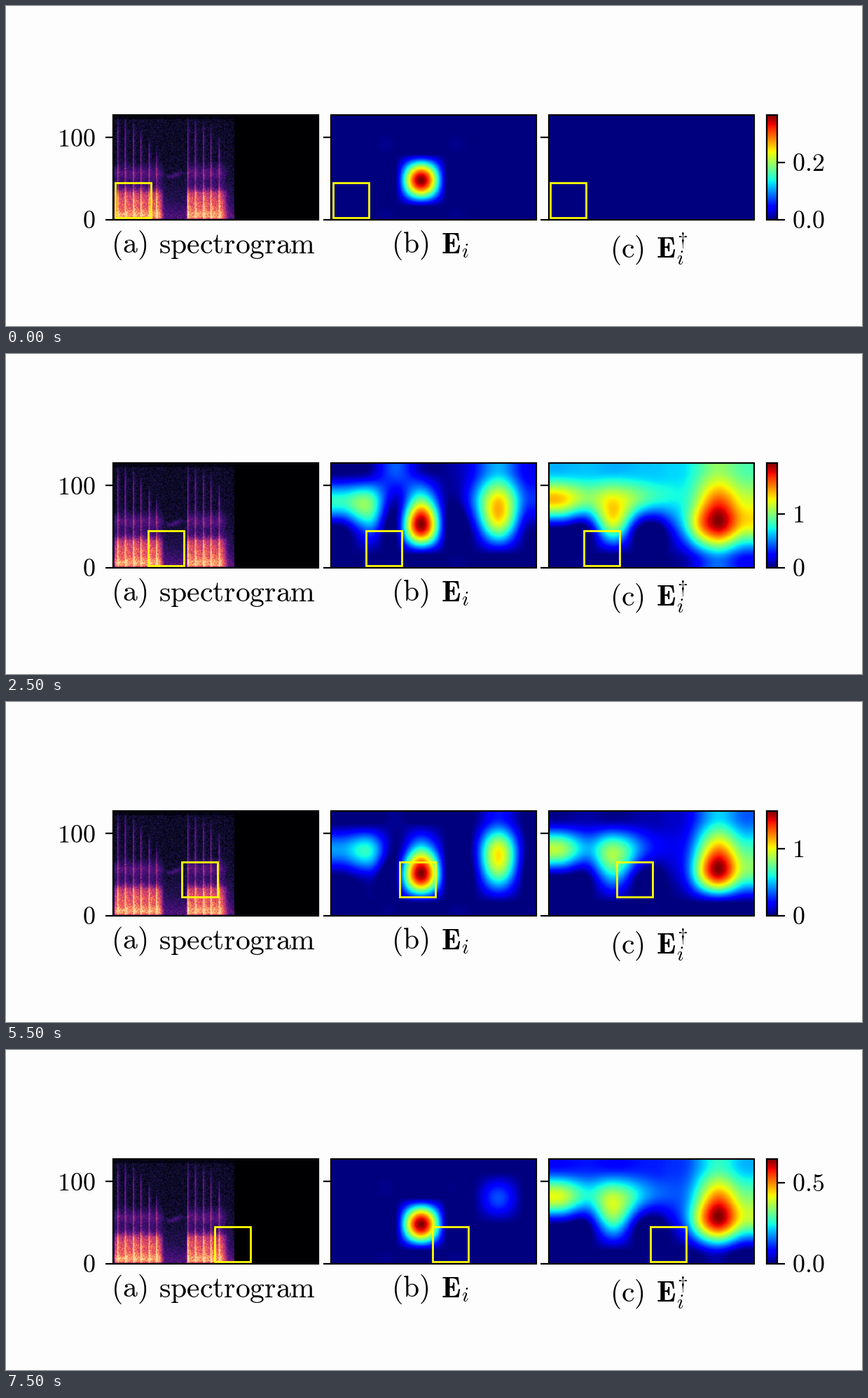
A matplotlib script for the animation above (8 s loop, 1222x458 px).

```python
import numpy as np
import matplotlib.pyplot as plt
from matplotlib.animation import FuncAnimation
from matplotlib.patches import Rectangle

W, H, DPI = 1222, 458, 128
PX = 72 / DPI  # points per pixel
FRAMES, INTERVAL = 16, 500
TOP, BOTTOM = 156, 306.2
LEFTS, PANEL_W = (153, 464, 774.5), 293.3
BAR_L, BAR_R = 1086, 1100.5
LINE = 2.22
BIG, MID, SMALL = 41.7, 36.1, 29.2

# Key points: step, peak of the middle map, threshold of the right map
KEYS = np.array([
    (0, 0.364, 1.2), (1, 0.85, 0.5), (2, 1.97, 0.22), (4, 2.49, 0), (7, 0.852, 0.5),
    (8, 1.1, 0.5), (9, 1.145, 0.5), (12, 1.76, 0.4), (15, 0.647, 0.35),
])

plt.rcParams["mathtext.fontset"] = "cm"


def bell(x, centre, width):
    return np.exp(-((x - centre) / width) ** 2 / 2)


def falling(x, middle, width):
    return 1 / (1 + np.exp((x - middle) / width))


def bumps(base, *items):
    """Coarse 4 x 8 map: a base per row plus (x, y, height, sx, sy) bells."""
    y, x = np.mgrid[:4, :8]
    return base(y) + sum(h * bell(x, cx, sx) * bell(y, cy, sy)
                         for cx, cy, h, sx, sy in items)


MAP_B = bumps(lambda y: -1.85 - 0.1 * y**2,
              (3, 1.9, 2.28, 0.45, 0.75), (6, 1.5, 1.6, 0.69, 1.1),
              (0, 0.95, 0.85, 0.4, 0.35), (1, 1.45, 1.4, 0.4, 0.55),
              (2, 0, 0.35, 0.5, 0.4))
MAP_C = bumps(lambda y: 0.17 - 0.3 * np.tanh(2 * y - 3),
              (6.1, 2.3, 0.95, 1.35, 0.65), (6.25, 1.05, 0.43, 0.7, 0.9),
              (0, 1, 0.38, 0.7, 0.35), (2, 2, 0.7, 0.42, 0.6),
              (2.4, 1, 0.22, 1, 0.3))


def cubic(x, a=-0.75):
    x = np.abs(x)
    near = (a + 2) * x**3 - (a + 3) * x**2 + 1
    far = a * (x**3 - 5 * x**2 + 8 * x - 4)
    return np.where(x <= 1, near, np.where(x < 2, far, 0))


def resampler(n, m):
    """Matrix that enlarges m cells to n samples with cubic weights."""
    pos = (np.arange(n) + 0.5) * m / n - 0.5
    mat = np.zeros((n, m))
    for j in range(-2, m + 2):
        mat[:, min(max(j, 0), m - 1)] += cubic(pos - j)
    return mat


ROWS, COLS = resampler(128, 4), resampler(250, 8)


def rectified(cells, lift):
    return np.maximum(ROWS @ np.maximum(cells + lift, 0) @ COLS.T, 0)


def with_peak(cells, peak):
    lift = peak
    for _ in range(6):
        lift += peak - rectified(cells, lift).max()
    return rectified(cells, lift)


def unit(field):
    return field / max(field.max(), 1e-9)


def spectrogram():
    rng = np.random.default_rng(7)
    t, f = np.arange(250), np.arange(128)[:, None]
    body = (0.08 + 0.1 * falling(f, 66, 3) + 0.07 * bell(f, 56, 4) + 0.1 * bell(f, 6, 3)
            + (0.52 - 0.006 * f) * falling(f, 35, 2))
    rest = 0.07 + 0.2 * np.exp(-f / 25)
    active = falling(t, 59, 1) + falling(-t, -89, 0.3) * falling(t, 136, 2)
    img = rest + (body - rest) * active
    img = img + 0.15 * bell(f, 54 + 2 * np.sin(t / 4), 2) * bell(t, 74, 7)

    for start, count in ((5, 6), (90, 5)):
        for k in range(count):
            age = t - round(start + 9.4 * k)
            reach = np.clip((130 - 1.6 * k**2 - f) / 25, 0, 1)
            hit = 0.27 * reach * np.exp(-age / 1.1) + 0.1 * falling(f, 38, 2) * np.exp(-age / 4)
            img = img + np.where(age >= 0, hit, 0)

    img = img + rng.normal(0, 0.06, img.shape) * (0.5 + img)
    img[:2] *= 0.7
    img[122:] *= 0.5
    img[:, 147:] = 0
    img[:, :2] *= 0.4
    return np.clip(img, 0, 0.93)


fig = plt.figure(figsize=(W / DPI, H / DPI), dpi=DPI, facecolor="#fdfdfd")
ax = fig.add_axes([0, 0, 1, 1])


def picture(data, left, right, cmap, origin="upper"):
    return ax.imshow(data, cmap=cmap, vmin=0, vmax=1, origin=origin, aspect="auto",
                     extent=(left, right, BOTTOM, TOP), zorder=1)


def frame(x, y, w, h, color="black", lw=LINE, zorder=4):
    return ax.add_patch(Rectangle((x, y), w, h, fill=False, ec=color, lw=lw * PX,
                                  joinstyle="miter", zorder=zorder))


def tick(x, length, y):
    return ax.plot([x, x + length], [y, y], color="black", lw=LINE * PX,
                   solid_capstyle="butt", zorder=4)[0]


def label(x, y, tex, size=BIG, ha="left"):
    return ax.text(x, y, f"${tex}$", fontsize=size * PX, ha=ha, va="baseline")


def level_y(value, peak):
    return BOTTOM - (BOTTOM - TOP) * value / peak


blank = np.zeros((128, 250))
picture(spectrogram(), LEFTS[0], LEFTS[0] + PANEL_W, "magma", "lower")
image_b = picture(blank, LEFTS[1], LEFTS[1] + PANEL_W, "jet")
image_c = picture(blank, LEFTS[2], LEFTS[2] + PANEL_W, "jet")
picture(np.linspace(1, 0, 256)[:, None], BAR_L, BAR_R, "jet")
ax.set(xlim=(0, W), ylim=(H, 0))
ax.axis("off")

boxes = []
for left in LEFTS:
    frame(left, TOP, PANEL_W, BOTTOM - TOP)
    for value in (0.5, 100.5):
        tick(left, -11.5, level_y(value, 128))
    box = frame(0, 0, 51, 50, "#ffff00", 2.8, 3)
    box.set_clip_path(Rectangle((left, TOP), PANEL_W, BOTTOM - TOP,
                                transform=ax.transData))
    boxes.append(box)
frame(BAR_L, TOP, BAR_R - BAR_L, BOTTOM - TOP)

label(127.5, 201, "100", MID, "right")
label(127.5, 318.5, "0", MID, "right")
tick(BAR_R, 11.5, BOTTOM)
bar_zero = label(1122.5, 318.5, "0", MID)
bar_tick = tick(BAR_R, 11.5, BOTTOM)
bar_label = label(1122.5, 318.5, "1", MID)

label(150, 353.5, r"\mathrm{(a)}")
label(217.5, 353.5, r"\mathrm{spectrogram}")
label(550, 353.5, r"\mathrm{(b)}")
label(621, 353.5, r"\mathbf{E}")
label(649.5, 360, "i", SMALL)
label(862, 360, r"\mathrm{(c)}")
label(927.5, 360, r"\mathbf{E}")
label(957, 370.5, "i", SMALL)
label(958, 343, r"\dagger", SMALL)


def update(n):
    col, row = divmod(n, 5)
    for box, left in zip(boxes, LEFTS):
        box.set_xy((left + 2.8 + 47.5 * col, 252.7 - 23.9 * row))

    peak, cut = (np.interp(n, KEYS[:, 0], KEYS[:, i]) for i in (1, 2))
    image_b.set_data(unit(with_peak(MAP_B, peak)))
    image_c.set_data(unit(rectified(MAP_C, -cut)))

    step = next(s for s, limit in ((0.2, 0.5), (0.5, 1), (1, 2), (2, 9)) if peak < limit)
    digits = 1 if step < 1 else 0
    y = level_y(step, peak)
    bar_tick.set_ydata([y, y])
    bar_label.set_y(y + 12.3)
    bar_label.set_text(f"${step:.{digits}f}$")
    bar_zero.set_text(f"${0:.{digits}f}$")
    return [*boxes, image_b, image_c, bar_tick, bar_label, bar_zero]


anim = FuncAnimation(fig, update, frames=FRAMES, interval=INTERVAL, repeat=True)
plt.show()
```
